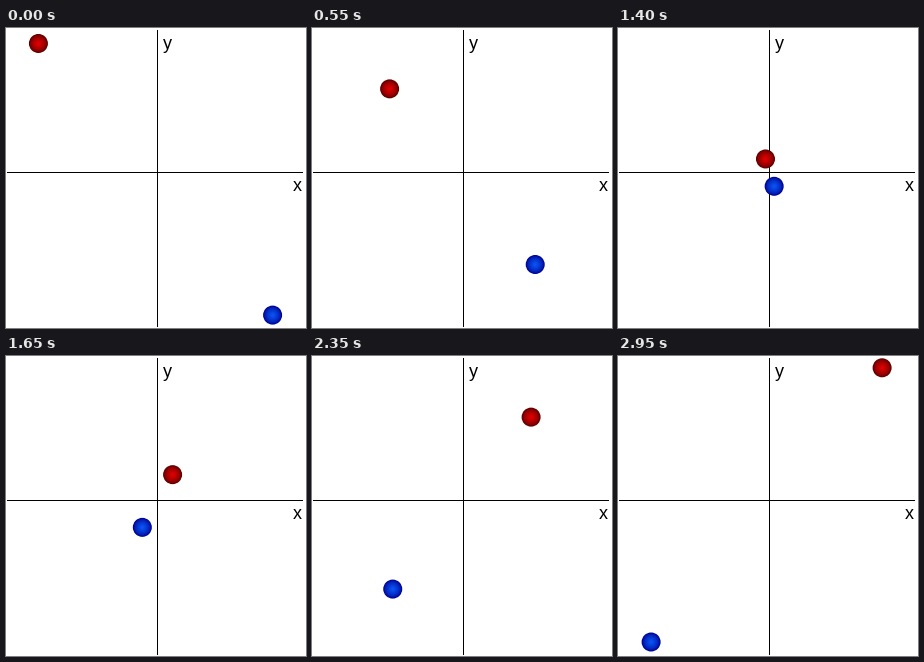
Write a matplotlib script that moves like this. It is 300 by 300 pixels and loops after 3 s.

```python
import matplotlib.pyplot as plt
import numpy as np
from matplotlib.animation import FuncAnimation
from matplotlib.patches import Circle, Rectangle

SIZE, DPI = 300, 100
PX = 72 / DPI  # one pixel in points
FRAMES, INTERVAL = 60, 50
HIT = 29  # step at which the balls collide
RADIUS = 9.5

fig = plt.figure(figsize=(SIZE / DPI, SIZE / DPI), dpi=DPI, facecolor="white")
ax = fig.add_axes([0, 0, 1, 1])
ax.set_xlim(0, SIZE)
ax.set_ylim(SIZE, 0)
ax.axis("off")


class Ball:
    """Shaded disc moving at constant velocity before and after the hit."""

    def __init__(self, rim, core, hit_pos, v_in, v_out):
        self.hit_pos, self.v_in, self.v_out = map(np.array, (hit_pos, v_in, v_out))
        rim, core = np.array(rim) / 255, np.array(core) / 255
        self.discs = []
        for k in np.linspace(0, 1, 12):
            disc = Circle((0, 0), RADIUS * (1 - 0.92 * k), lw=0, zorder=3,
                          facecolor=rim + (core - rim) * k ** 0.65)
            self.discs.append(ax.add_patch(disc))

    def move(self, step):
        v = self.v_in if step < HIT else self.v_out
        pos = self.hit_pos + v * (step - HIT)
        for disc in self.discs:
            disc.set_center(pos)


def bar(x, y, w, h):
    ax.add_patch(Rectangle((x, y), w, h, color="black", lw=0, zorder=1))


def label(x, y, text):
    ax.text(x, y, text, family="Liberation Sans", size=18 * PX,
            ha="left", va="baseline", color="black", zorder=2)


bar(151, 2, 1, 297)
bar(1, 144, 296, 1)
label(156.6, 21, "y")
label(286.8, 163, "x")

balls = [
    Ball((90, 0, 0), (225, 0, 0), (151.6, 135.1), (4.11, 4.125), (3.75, -4.11)),
    Ball((0, 0, 145), (10, 85, 245), (152.2, 153.7), (-3.945, -4.6), (-3.97, 4.41)),
]


def update(step):
    for ball in balls:
        ball.move(step)
    return [disc for ball in balls for disc in ball.discs]


anim = FuncAnimation(fig, update, frames=FRAMES, interval=INTERVAL,
                     repeat=True, repeat_delay=0, blit=False)
plt.show()
```
